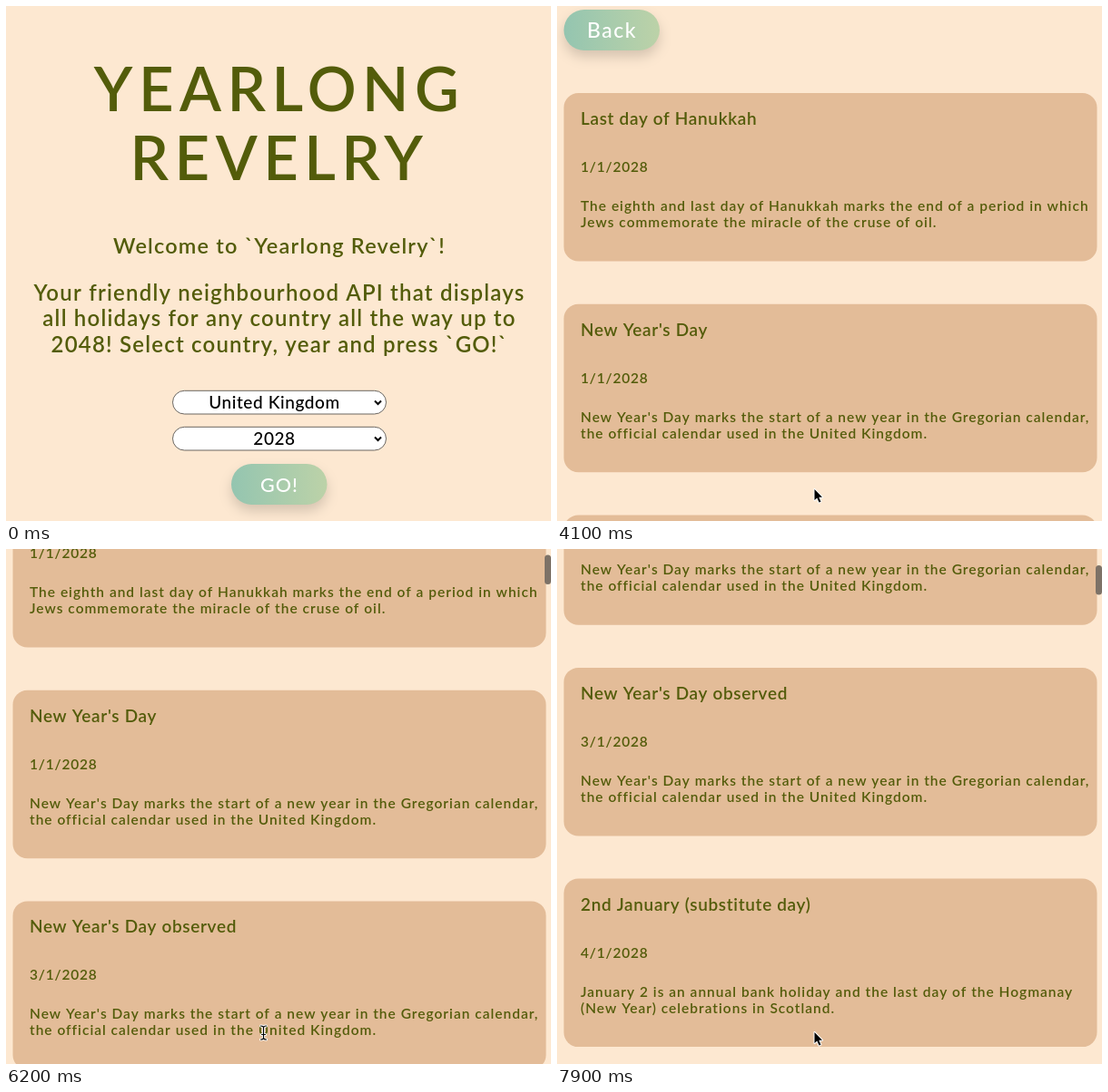
Recreate the animation shown at these times as an HTML page with a canvas. Size 600 by 568 pixels, loop 8000 ms.

```html
<!DOCTYPE html>
<html lang="en">
<head>
<meta charset="utf-8">
<title>Yearlong Revelry</title>
<style>
html, body { margin: 0; overflow: hidden; background: #fde8d1; }
canvas { display: block; }
</style>
</head>
<body>
<canvas id="stage" width="600" height="568"></canvas>
<script>
const ctx = document.getElementById('stage').getContext('2d');
const LOOP = 8000, STEP = 100, RESULTS_AT = 3200;
const OLIVE = '#535c0a', PEACH = '#fde8d1', TAN = '#e3bc98';
const FIRST_CARD = 96, PITCH = 232.7, CARD_HEIGHT = 185.5;

const newYear = ['New Year\'s Day marks the start of a new year in the Gregorian calendar,',
  'the official calendar used in the United Kingdom.'];
const holidays = [
  ['Last day of Hanukkah', '1/1/2028',
    'The eighth and last day of Hanukkah marks the end of a period in which',
    'Jews commemorate the miracle of the cruse of oil.'],
  ['New Year\'s Day', '1/1/2028', ...newYear],
  ['New Year\'s Day observed', '3/1/2028', ...newYear],
  ['2nd January (substitute day)', '4/1/2028',
    'January 2 is an annual bank holiday and the last day of the Hogmanay',
    '(New Year) celebrations in Scotland.']
];
// [time, scroll offset]
const scrollStops = [[4500, 0], [5200, 92], [6200, 173], [7000, 330],
  [7500, 392], [7600, 392], [7900, 430.5]];

const smooth = x => { x = Math.min(1, Math.max(0, x)); return x * x * (3 - 2 * x); };

function scrollAt(t) {
  let y = 0;
  for (let i = 1; i < scrollStops.length; i++) {
    const [t0, y0] = scrollStops[i - 1], [t1, y1] = scrollStops[i];
    y += (y1 - y0) * smooth((t - t0) / (t1 - t0));
  }
  return y;
}

function text(str, x, y, size, { color = OLIVE, weight = 600, spacing = 1, align = 'left' } = {}) {
  ctx.font = `${weight} ${size}px Lato, sans-serif`;
  ctx.letterSpacing = spacing + 'px';
  ctx.textAlign = align;
  ctx.fillStyle = color;
  ctx.fillText(str, x, y);
}

function box(x, y, w, h, r, fill, stroke, line = 1) {
  ctx.beginPath();
  ctx.roundRect(x, y, w, h, r);
  if (fill) { ctx.fillStyle = fill; ctx.fill(); }
  if (stroke) { ctx.strokeStyle = stroke; ctx.lineWidth = line; ctx.stroke(); }
}

function button(label, x, y, size, spacing) {
  const fill = ctx.createLinearGradient(x, 0, x + 105, 0);
  fill.addColorStop(0, '#94c5b0');
  fill.addColorStop(1, '#bcd2a8');
  ctx.save();
  ctx.shadowColor = 'rgba(0,0,0,.16)';
  ctx.shadowBlur = 14;
  ctx.shadowOffsetY = 7;
  box(x, y, 105.5, 45, 22.5, fill);
  ctx.restore();
  text(label, x + 53, y + 30.5, size, { color: '#fff', weight: 500, spacing, align: 'center' });
}

function select(label, y, focused) {
  box(183.5, y + .3, 235, 25.7, 13, '#fff', '#6b6660');
  if (focused) box(184, y + .5, 234.5, 25.5, 3, null, '#1457b8', 2);
  text(label, 295.5, y + 19.5, 19, { color: '#000', weight: 500, spacing: .6, align: 'center' });
  ctx.beginPath();
  ctx.moveTo(406, y + 11.5);
  ctx.lineTo(409.5, y + 15);
  ctx.lineTo(413, y + 11.5);
  ctx.strokeStyle = '#000';
  ctx.lineWidth = 2;
  ctx.stroke();
}

function home(t) {
  const heading = { align: 'center', spacing: 6.5 };
  const intro = { align: 'center', spacing: 1.2 };
  text('YEARLONG', 301, 116, 67, heading);
  text('REVELRY', 301, 192, 67, heading);
  text('Welcome to `Yearlong Revelry`!', 301, 273, 23.5, intro);
  text('Your friendly neighbourhood API that displays', 301, 325, 24, intro);
  text('all holidays for any country all the way up to', 301, 353, 24, intro);
  text('2048! Select country, year and press `GO!`', 301, 382, 24, intro);
  select('United Kingdom', 424, false);
  select('2028', 464, t >= 100);
  button('GO!', 248, 505, 21.5, 1);
}

function results(scroll) {
  button('Back', 7.5, 4 - scroll, 23, 1.5);
  holidays.forEach(([title, date, line1, line2], i) => {
    const y = FIRST_CARD + i * PITCH - scroll;
    box(7.5, y, 587, CARD_HEIGHT, 16, TAN);
    text(title, 26, y + 35, 19, { spacing: .65 });
    text(date, 26, y + 87, 15.5, { spacing: .8 });
    text(line1, 26, y + 130, 15.5);
    text(line2, 26, y + 148, 15.5);
  });
  if (scroll > 0) box(593, scroll * .044 - 1, 7, 32.5, 3.5, '#7d7267');
}

function shape(path, x, y, fill, stroke, line) {
  const p = new Path2D(path);
  ctx.save();
  ctx.translate(x, y);
  ctx.lineJoin = ctx.lineCap = 'round';
  ctx.strokeStyle = stroke;
  ctx.lineWidth = line;
  ctx.stroke(p);
  if (fill) { ctx.fillStyle = fill; ctx.fill(p); }
  ctx.restore();
}

const arrow = (x, y) =>
  shape('M0 0V12L2.8 9.4L5 14.6L7 13.7L4.8 8.7H8.5Z', x, y, '#000', '#fff', 2);

function hand(x, y) {
  shape('M-2 1Q-1 -1 1 1L2.5 5Q4 3.5 5 5Q7 4 7.5 6Q10 5 10 8L9 11.5V14H2.5Q1 11.5 -3 9Q-4 7 -1.5 7L0 8Z',
    x, y, '#fff', '#000', 1.8);
  shape('M3.8 9V11.5M5.6 9V11.5M7.4 9V11.5', x, y, null, '#000', .8);
}

function ibeam(x, y) {
  const path = 'M-3 -7.5Q0 -7.5 0 -5.5Q0 -7.5 3 -7.5M0 -5.5V5.5M-2 2H2M-3 7.5Q0 7.5 0 5.5Q0 7.5 3 7.5';
  shape(path, x, y, null, '#fff', 3);
  shape(path, x, y, null, '#000', 1.2);
}

function pointer(t, scroll) {
  if (t < 300) return;
  if (t < 3700) {
    const k = smooth((t - 300) / 600);
    const x = 300 - 20 * k, y = 478 + 59 * k;
    (y > 505 ? hand : arrow)(x, y);
    return;
  }
  // The pointer stays put, and turns into an I-beam over lines of text.
  const inCard = (533 - FIRST_CARD + scroll) % PITCH;
  const overText = [[18, 41], [69, 92], [115, 153]].some(([a, b]) => inCard >= a && inCard <= b);
  if (overText) ibeam(283.5, 533.5);
  else arrow(283.5, 533);
}

function draw() {
  const t = Math.floor(performance.now() % LOOP / STEP) * STEP;
  const scroll = scrollAt(t);
  ctx.fillStyle = PEACH;
  ctx.fillRect(0, 0, 600, 568);
  if (t < RESULTS_AT) home(t);
  else results(scroll);
  pointer(t, scroll);
  requestAnimationFrame(draw);
}
draw();
</script>
</body>
</html>
```
